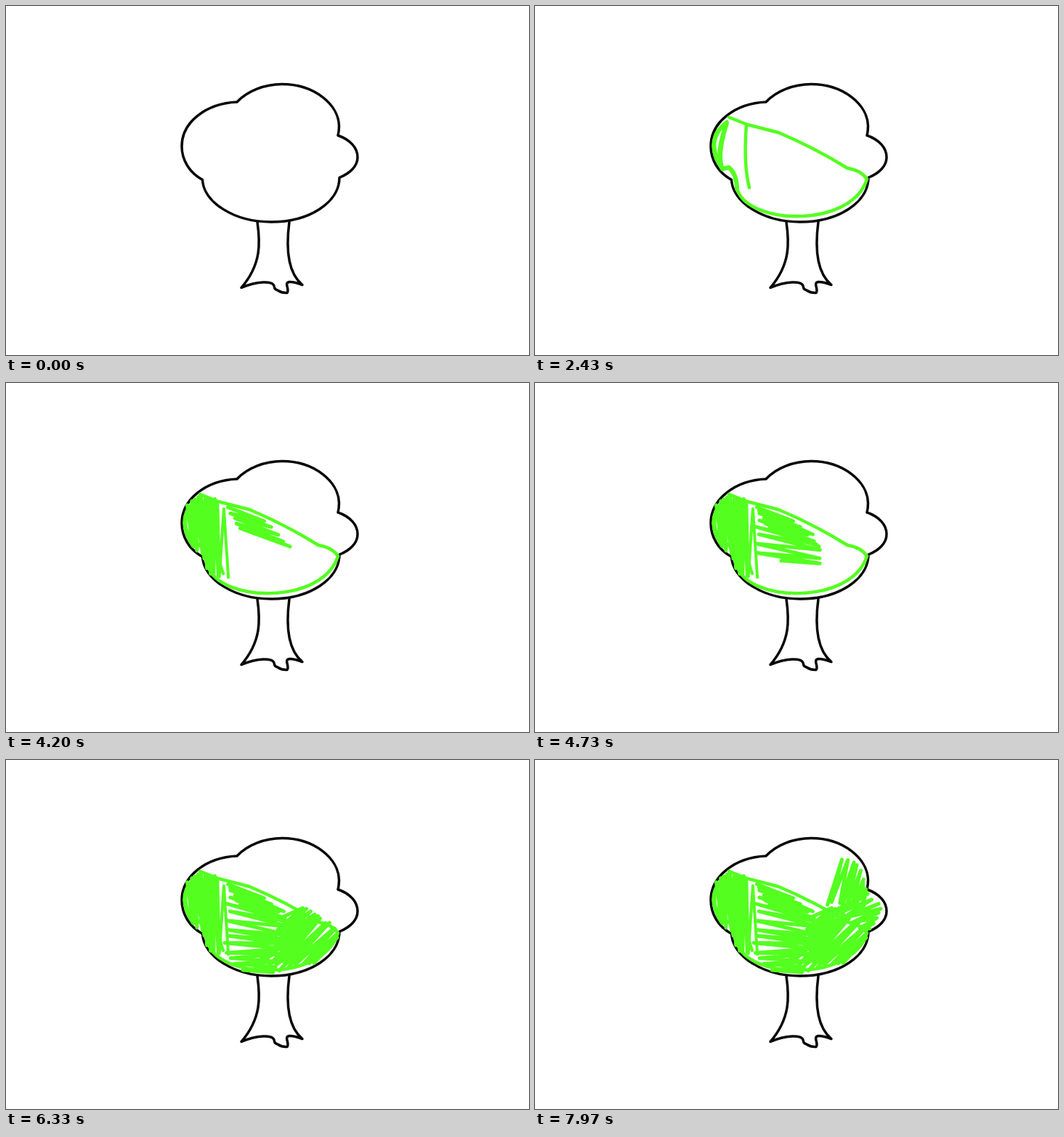
An HTML page for the animation above (8 s loop, 720 px wide and 480 px high).

```html
<!DOCTYPE html>
<html lang="en">
<head>
<meta charset="utf-8">
<title>Colouring a tree</title>
<style>
  html, body { margin: 0; width: 100%; height: 100%; overflow: hidden; background: #fff; }
  svg { display: block; width: 100vw; height: 100vh; }
  path { fill: none; stroke-linecap: round; stroke-linejoin: round; }
  .ink { stroke: #080608; stroke-width: 3.5; }
  #paint { stroke: #54ff20; }
</style>
</head>
<body>
<svg viewBox="0 0 720 480">
  <g class="ink">
    <path d="M318 132C332 117 356 107.500 380 107.500C425 107.500 458 136 458.500 165Q458.500 172 457 178C474 184 484 195 484 208C484 220 474 230 459 236C459 270 418 297 365 297C314 297 272 270 270.500 239C252 229 242 211 242 193C242 160 275 134 318 132Z"/>
    <path d="M346 297C350 325 352 355 324 387.500C343 379 369 376 369.500 387Q370 390 374 391Q380 395 387 394.500C391 389 382 381 390 379.500Q396 379 408 383.500C388 367 385 335 390 297"/>
  </g>
  <g id="paint"></g>
</svg>
<script>
const LOOP = 8000;
const paint = document.getElementById('paint');
let clock = 670;

let seed = 7;
const random = () => (seed = seed * 16807 % 2147483647) / 2147483647;
const wobble = size => (random() - 0.5) * size;

function makePath(d) {
  const path = document.createElementNS('http://www.w3.org/2000/svg', 'path');
  path.setAttribute('d', d);
  return path;
}

// Draws a line along its length, starting where the last one ended.
function trace(duration, d, width = 4.5) {
  const path = makePath(d);
  path.setAttribute('pathLength', 1000);
  path.setAttribute('stroke-width', width);
  path.setAttribute('stroke-dasharray', '1000 2000');
  paint.append(path);
  const start = clock / LOOP;
  clock += duration;
  path.animate([
    { strokeDashoffset: 1010, offset: 0 },
    { strokeDashoffset: 1010, offset: start },
    { strokeDashoffset: 0, offset: clock / LOOP },
    { strokeDashoffset: 0, offset: 1 }
  ], { duration: LOOP, iterations: Infinity });
}

// Zigzags with an unsteady hand between two guide lines.
function scribble(duration, from, to, turns, width = 5) {
  const guides = [makePath(from), makePath(to)];
  const corners = Array.from({ length: turns + 1 }, (_, i) => {
    const guide = guides[i % 2];
    const p = guide.getPointAtLength(guide.getTotalLength() * i / turns);
    return `${(p.x + wobble(5)).toFixed(1)} ${(p.y + wobble(5)).toFixed(1)}`;
  });
  trace(duration, 'M' + corners.join('L'), width);
}

// Left edge, then the border of the lower area
trace(930, 'M264 160Q232 185 258 224Q248 205 264 161Q250 205 258 224L267 222Q278 232 278 251', 6);
trace(700, 'M278 251C292 302 436 306 457 238Q449 226 430 223Q385 195 335 174L292 163L267 153');

// Left side
trace(150, 'M291 163Q286 230 299 262');
scribble(680, 'M252 166Q258 153 288 161', 'M255 222L272 236L282 265L294 266', 17);
scribble(570, 'M260 162L304 172', 'M270 236L288 266L306 269', 9, 4);

// Middle
scribble(500, 'M306 172L322 204', 'M352 186L390 226', 9);
scribble(950, 'M308 176L302 270L330 290', 'M382 205L394 238L370 290', 23);
scribble(280, 'M352 272L378 289', 'M398 224L414 226L406 260', 8);

// Right side
scribble(900, 'M370 222L382 285L425 279', 'M404 200L453 231L455 250', 24);

// Side bump and upper right
scribble(670, 'M410 208L456 234', 'M456 183Q492 207 462 232', 15);
scribble(970, 'M453 178Q450 130 419 140', 'M454 204L404 197', 15);
</script>
</body>
</html>
```
